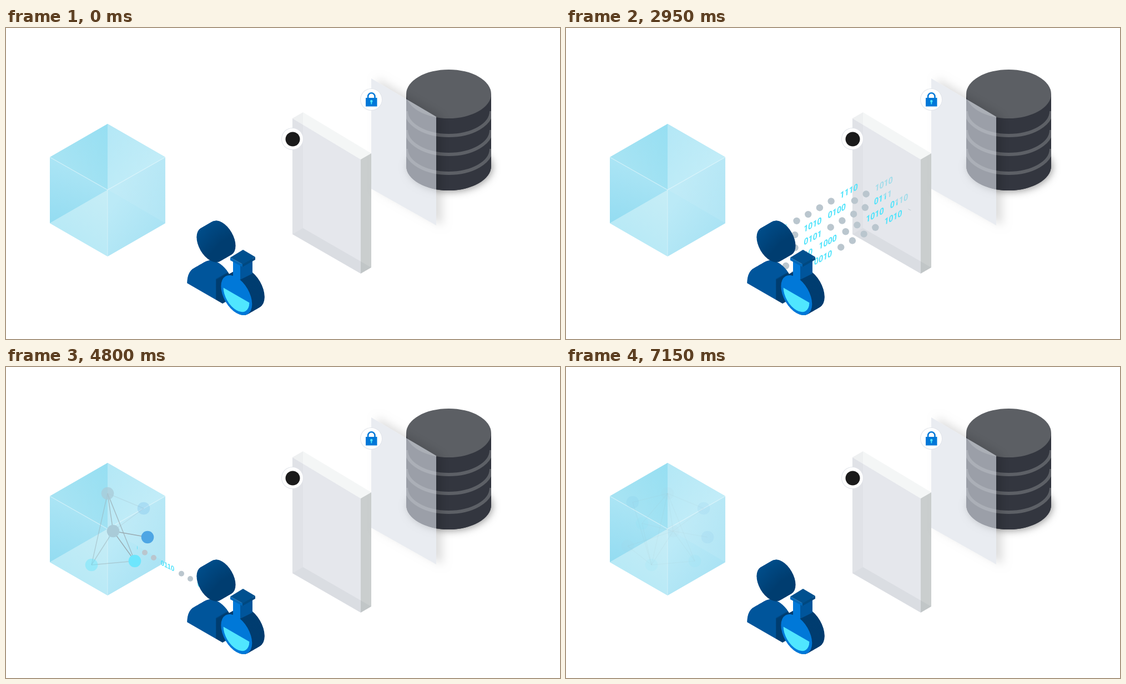
Recreate the animation shown at these times as an HTML page with a canvas. Size 998 by 561 pixels, loop 7.2 s.

```html
<!DOCTYPE html>
<html lang="en">
<head>
<meta charset="utf-8">
<title>Private data pipeline</title>
<style>
html, body { margin: 0; width: 100%; height: 100%; overflow: hidden; background: #fff; }
canvas { display: block; }
</style>
</head>
<body>
<canvas id="stage" width="998" height="561"></canvas>
<script>
const ctx = document.getElementById('stage').getContext('2d');
const LOOP = 7200, STEP = 50, SLOPE = 0.577, TAU = Math.PI * 2;
const CYAN = '#4fe3fb', GREY = '#bac6ce';
const BLUE = '#0078d8', MID = '#00559b', DARK = '#003d70';
const clamp = v => Math.max(0, Math.min(1, v));

// Parallel lanes of data: left end, then dots (o) and four-digit words in order
const lanes = [
  [341, 'o1101oooo1110'],
  [317, 'o0011oo10100100oo1010'],
  [338, '1100oo0101oooo0111o'],
  [365, 'oo11101000oo10100110o'],
  [400, 'oo0010oooo1010oo']
];
const DOT_W = 20.7, WORD_W = 43.5;

// Network nodes; colours repeat in threes and every link starts at a hub
const nodes = [
  [193, 296], [232, 350], [255, 307],
  [183, 228], [154, 357], [248, 255],
  [111, 323], [137, 282], [120, 244]
];
const nodeColors = ['#a9cbd8', '#6ee6fd', '#4ea6e4'];
const hubs = { 0: '1234567', 3: '14578', 4: '1678' };

function trace(p) {
  ctx.beginPath();
  for (let i = 0; i < p.length; i += 2) ctx.lineTo(p[i], p[i + 1]);
}

function poly(fill, ...p) {
  trace(p);
  ctx.fillStyle = fill;
  ctx.fill();
}

function line(color, width, ...p) {
  trace(p);
  ctx.strokeStyle = color;
  ctx.lineWidth = width;
  ctx.stroke();
}

function oval(x, y, rx, ry, fill) {
  ctx.beginPath();
  ctx.ellipse(x, y, rx, ry, 0, 0, TAU);
  ctx.fillStyle = fill;
  ctx.fill();
}

const disc = (x, y, r, fill) => oval(x, y, r, r, fill);

function blend(x0, y0, x1, y1, a, b) {
  const g = ctx.createLinearGradient(x0, y0, x1, y1);
  g.addColorStop(0, a);
  g.addColorStop(1, b);
  return g;
}

function scoped(draw) {
  ctx.save();
  draw();
  ctx.restore();
}

function shadow(color, blur, x, y) {
  ctx.shadowColor = color;
  ctx.shadowBlur = blur;
  ctx.shadowOffsetX = x;
  ctx.shadowOffsetY = y;
}

function word(text, x, y, font, matrix) {
  scoped(() => {
    ctx.transform(...matrix, x, y);
    ctx.font = font;
    ctx.textAlign = 'center';
    ctx.textBaseline = 'middle';
    ctx.fillStyle = CYAN;
    ctx.fillText(text, 0, 1);
  });
}

// Left-facing isometric plane centred on x, y
function plane(x, y, draw) {
  scoped(() => {
    ctx.transform(0.866, 0.5, 0, 1, x, y);
    draw();
  });
}

// Sweeps a shape backwards into the plane, then draws its blue face
function solid(shape, depth, side) {
  for (let d = depth; d >= 0; d -= 0.5) {
    scoped(() => {
      ctx.translate(d, -d);
      shape(d ? side : BLUE);
    });
  }
}

function database() {
  const x = 797.5, rx = 76.5, ry = 44;
  scoped(() => {
    shadow('rgba(0,0,0,.4)', 14, 2, 2);
    oval(x, 249, rx, ry, '#33363f');
  });
  oval(x, 249, rx, ry, '#33363f');
  ctx.fillRect(x - rx, 119, rx * 2, 130);
  scoped(() => {
    ctx.beginPath();
    ctx.rect(x - rx, 70, rx * 2, 230);
    ctx.clip();
    ctx.strokeStyle = '#5d6066';
    ctx.lineWidth = 6;
    for (let y = 150; y < 220; y += 34) {
      ctx.beginPath();
      ctx.ellipse(x, y, rx, ry, 0, 0, Math.PI);
      ctx.stroke();
    }
  });
  oval(x, 119, rx, ry, '#5c5f64');
}

function thinPanel() {
  const pane = [658, 91, 775, 160, 775, 356, 658, 290];
  // Shadow only, kept outside the pane
  scoped(() => {
    trace(pane);
    ctx.closePath();
    ctx.rect(0, 0, 998, 561);
    ctx.clip('evenodd');
    shadow('rgba(0,0,0,.13)', 16, 1011, 0);
    ctx.translate(-1000, 0);
    poly('#000', ...pane);
  });
  poly('rgba(219,224,233,.62)', ...pane);
}

function thickPanel() {
  poly('rgba(213,217,225,.62)', 516, 163, 639, 237, 639, 443, 516, 372);
  poly('rgba(170,176,176,.62)', 639, 237, 658, 226, 658, 432, 639, 443);
  poly('rgba(238,240,240,.62)', 516, 163, 535, 152, 658, 226, 639, 237);
  poly('rgba(150,155,165,.07)', 516, 163, 535, 152, 535, 361, 516, 372);
  poly('rgba(120,125,135,.1)', 516, 372, 535, 361, 658, 432, 639, 443);
}

function badge(x, y) {
  disc(x, y, 20, '#e1e4ea');
  disc(x, y, 19, '#fff');
}

function badges() {
  badge(516, 200);
  disc(516.5, 200.5, 13, '#1b1b1b');
  badge(658, 129);
  ctx.beginPath();
  ctx.arc(658.3, 123.5, 6.2, Math.PI, 0);
  ctx.lineTo(664.5, 127);
  ctx.moveTo(652.1, 123);
  ctx.lineTo(652.1, 127);
  ctx.strokeStyle = BLUE;
  ctx.lineWidth = 2.6;
  ctx.stroke();
  ctx.fillStyle = BLUE;
  ctx.fillRect(648, 126, 20.5, 15.5);
  disc(658.3, 132, 2.2, CYAN);
  ctx.fillRect(657.4, 132, 1.8, 5.5);
}

function cube() {
  poly('#b0e6f5', 183, 173, 287, 233, 287, 352, 183, 412, 79, 352, 79, 233);
  poly(blend(183, 180, 95, 235, '#97dff2', '#a6e3f3'), 183, 173, 183, 292, 79, 233);
  poly(blend(183, 190, 270, 260, '#b5e8f6', '#c3edf8'), 183, 173, 287, 233, 183, 292);
  poly(blend(85, 350, 125, 245, '#94dcf1', '#ace5f5'), 79, 233, 183, 292, 79, 352);
  poly(blend(183, 300, 120, 390, '#c6edf6', '#b7e9f6'), 79, 352, 183, 292, 183, 412);
  poly(blend(200, 290, 287, 320, '#c0ebf7', '#b3e6f5'), 287, 233, 287, 352, 183, 292);
  poly(blend(190, 320, 260, 380, '#bbeaf7', '#aae3f4'), 287, 352, 183, 412, 183, 292);
  line('rgba(255,255,255,.45)', 1.2, 79, 233, 183, 292, 287, 233);
  line('rgba(255,255,255,.3)', 1.2, 183, 292, 183, 412);
}

function network(t) {
  const fade = clamp((7180 - t) / 400);
  const shown = nodes.map((n, i) => clamp((t - 4400 - i * 70) / 250) * fade);
  scoped(() => {
    for (const hub in hubs) {
      for (const end of hubs[hub]) {
        ctx.globalAlpha = Math.min(shown[hub], shown[end]);
        line('#9aabb2', 1.4, ...nodes[hub], ...nodes[end]);
      }
    }
    nodes.forEach(([x, y], i) => {
      ctx.globalAlpha = shown[i];
      disc(x, y, 11.3, nodeColors[i % 3]);
    });
  });
}

// Shift of the lanes along their direction, slowing to rest
function travel(t) {
  const u = Math.min((t - 2250) / 700, 4.14);
  return 164 + u * (-175.7 + u * (9.874 + u * 1.826));
}

// Part of the lanes between two parallel slanted lines
function band(t, top, bottom, withDots) {
  const shift = travel(t);
  scoped(() => {
    trace([370, top + SLOPE * 370, 998, top + SLOPE * 998, 998, bottom + SLOPE * 998, 370, bottom + SLOPE * 370]);
    ctx.clip();
    lanes.forEach(([left, items], i) => {
      let edge = left + shift;
      for (const item of items.match(/o|\d{4}/g)) {
        const width = item === 'o' ? DOT_W : WORD_W;
        const x = edge + width / 2, y = 586.5 + 23.3 * i - 0.574 * x;
        if (item !== 'o') word(item, x, y, 'bold 16.5px Roboto, Arial, sans-serif', [0.85, -0.45, -0.08, 1]);
        else if (withDots) disc(x, y, 6.2, GREY);
        edge += width;
      }
    });
  });
}

// Repeating dot, word, dot pattern from the person to the cube
function results(t) {
  const y = x => 367 + (x - 306) * SLOPE;
  scoped(() => {
    ctx.beginPath();
    ctx.rect(236, 0, 139, 561);
    ctx.clip();
    for (let k = 0; k < 7; k++) {
      const x = 331 + 66 * k - (t - 4000) * 0.215;
      disc(x - 25, y(x - 25), 5, GREY);
      if (k < 6) disc(x + 25, y(x + 25), 5, GREY);
      word('0110', x, y(x), 'bold 13px "Liberation Sans", Arial, sans-serif', [0.86, 0.43, 0, 1]);
    }
  });
}

function shoulders(fill) {
  ctx.beginPath();
  ctx.moveTo(-37, 0);
  ctx.bezierCurveTo(-37, -52, 37, -66, 37, 0);
  ctx.fillStyle = fill;
  ctx.fill();
}

function person() {
  const bodySide = ctx.createLinearGradient(-37, 0, 37, 0);
  bodySide.addColorStop(0.8, MID);
  bodySide.addColorStop(0.82, DARK);
  plane(358, 479, () => solid(shoulders, 25.4, bodySide));
  const headSide = blend(-25, -25, 12, 0, '#00508f', DARK);
  plane(367.3, 391.5, () => solid(fill => disc(0, 0, 28, fill), 25.4, headSide));
}

function flask() {
  plane(415.3, 482, () => solid(fill => disc(0, 0, 32.3, fill), 26, DARK));
  poly(BLUE, 409, 419, 422, 427, 422, 454, 409, 452);
  poly(MID, 422, 427, 444, 415, 444, 443, 422, 454);
  poly('#0067b8', 404, 414, 426, 426, 426, 431, 404, 419);
  poly('#004880', 426, 426, 449, 413, 449, 418, 426, 431);
  poly('#00508f', 404, 414, 427, 400, 449, 413, 426, 426);
  plane(415, 482, () => {
    ctx.beginPath();
    ctx.arc(0, 0, 27, 0, Math.PI);
    ctx.fillStyle = '#50e6ff';
    ctx.fill();
  });
}

function frame(now) {
  const t = Math.floor((now % LOOP) / STEP) * STEP;
  ctx.fillStyle = '#fff';
  ctx.fillRect(0, 0, 998, 561);
  database();
  band(t, -223.5, -206);
  thinPanel();
  band(t, -206, -29.8);
  thickPanel();
  band(t, -29.8, 600, true);
  badges();
  cube();
  network(t);
  results(t);
  person();
  flask();
}

const start = performance.now();
function tick() {
  frame(performance.now() - start);
  requestAnimationFrame(tick);
}
tick();
</script>
</body>
</html>
```
